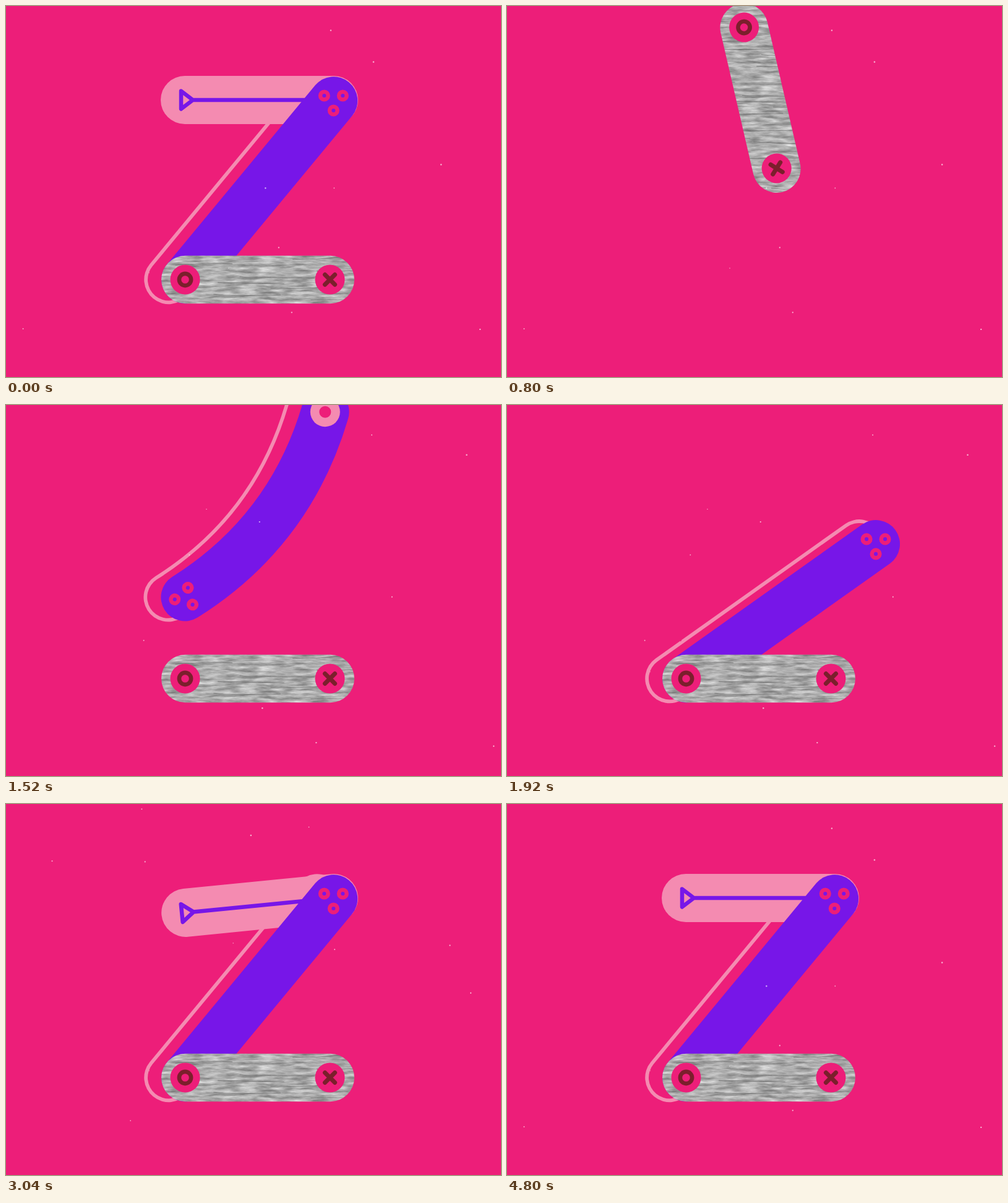
Recreate the animation shown at these times as an HTML page. Size 800 by 600 pixels, loop 4840 ms.

```html
<!DOCTYPE html>
<html lang="en">
<head>
<meta charset="utf-8">
<title>Z</title>
<style>
  html, body { margin: 0; height: 100%; overflow: hidden; background: #ed1e79; }
  svg { display: block; }
</style>
</head>
<body>
<svg width="800" height="600" viewBox="0 0 800 600" fill="none" stroke-linecap="round" stroke-linejoin="round">
  <defs>
    <path id="bar"/>
    <clipPath id="plank"><rect id="plankShape" x="-156" y="-38.7" width="312" height="77.4" rx="38.7"/></clipPath>
    <filter id="rough" filterUnits="userSpaceOnUse" x="0" y="0" width="800" height="600" color-interpolation-filters="sRGB">
      <feTurbulence type="fractalNoise" baseFrequency=".14" numOctaves="1" result="noise"/>
      <feDisplacementMap in="SourceGraphic" in2="noise" scale="1.6" xChannelSelector="R" yChannelSelector="G"/>
    </filter>
    <filter id="grain" filterUnits="userSpaceOnUse" x="-160" y="-160" width="320" height="320" color-interpolation-filters="sRGB">
      <feTurbulence type="fractalNoise" baseFrequency=".035 .2" numOctaves="4" seed="4"/>
      <feColorMatrix values=".55 0 0 0 .4  .55 0 0 0 .4  .55 0 0 0 .4  0 0 0 0 1"/>
    </filter>
  </defs>
  <rect width="800" height="600" fill="#ed1e79"/>
  <g filter="url(#rough)">
    <use href="#bar" x="-27" stroke="#f48bb1" stroke-width="79.5"/>
    <use href="#bar" x="-27" stroke="#ed1e79" stroke-width="68"/>
    <g id="pink">
      <path d="M0 0H241" stroke="#f48bb1" stroke-width="78"/>
      <path d="M0 0H228L247 -14.5V14.5L228 0" stroke="#7716e8" stroke-width="6.5"/>
    </g>
    <use href="#bar" stroke="#7716e8" stroke-width="77.5"/>
    <g id="ring">
      <circle r="24" fill="#f48bb1"/>
      <circle r="9.5" fill="#ed1e79"/>
    </g>
    <g id="dots" stroke="#ed1e79" stroke-width="6.5">
      <circle cx="-15.2" cy="-8" r="6.3"/>
      <circle cx="14.8" cy="-8" r="6.3"/>
      <circle cx="-.2" cy="16" r="6.3"/>
    </g>
  </g>
  <g id="wood">
    <g clip-path="url(#plank)">
      <rect x="-160" y="-160" width="320" height="320" filter="url(#grain)"/>
      <path id="cracks" stroke="#555" stroke-opacity=".55"/>
    </g>
    <g id="marks" stroke="#7b1f2c">
      <g fill="#ed1e79" stroke="none"><circle cx="-117.5" r="24"/><circle cx="116.5" r="24"/></g>
      <circle cx="-117.5" r="9.6" stroke-width="6.6"/>
      <path d="M108.5 -8l16 16m0 -16l-16 16" stroke-width="7"/>
    </g>
  </g>
  <g id="dust" fill="#fff" fill-opacity=".65"></g>
</svg>
<script>
const LOOP = 4840, STEP = 40, DUST_STEP = 80, DUST_SETS = 5, EXIT_END = 600;
const el = id => document.getElementById(id);
const place = (id, [x, y], angle = 0) =>
  el(id).setAttribute('transform', `translate(${x} ${y}) rotate(${angle})`);
const mix = (a, b, f) => a + (b - a) * f;
const polar = (r, deg) => [r * Math.cos(deg * Math.PI / 180), r * Math.sin(deg * Math.PI / 180)];

// Each piece falls from one centre and angle to another, then swings to rest.
const wood = {
  length: 234, start: 800, land: 1000, from: [409.5, 149], to: [407, 442.5],
  tilt: 77, rest: 360, swing: 18, swings: 2, settle: 500, drop: 10, spin: 22
};
const purple = {
  length: 375.7, start: 1520, land: 1660, from: [402.5, 161], to: [409.75, 297.75], hinged: true,
  tilt: 127.1, rest: 309.6, swing: 15.1, swings: 1, settle: 560, drop: 60, spin: 12
};
const pink = {
  length: 241, start: 2360, land: 2500, from: [379, -18], to: [409.5, 152], hinged: true,
  tilt: 37.3, rest: 180, swing: 24.2, swings: 2, settle: 900, drop: 110, spin: -14
};

function pose(p, t) {
  const leaving = t < EXIT_END;
  const gone = leaving ? Math.max(0, t - p.drop) : 0;
  const fall = leaving ? 1 : Math.min(1, (t - p.start) / (p.land - p.start));
  const s = leaving ? 1 : Math.min(1, Math.max(0, (t - p.land) / p.settle));
  const sway = p.swing * Math.sin(Math.PI * p.swings * s) * (1 - s) ** (p.swings - 1);
  const angle = mix(p.tilt, p.rest, fall) + sway + p.spin * (gone / 400) ** 2;

  const centre = [0, 1].map(k => mix(p.from[k], p.to[k], fall));
  centre[1] += .0034 * gone * gone;
  const arm = polar(p.length, angle);
  const half = polar(p.length / 2, p.hinged ? angle - sway : angle);
  const tail = centre.map((c, k) => c - half[k]);
  const head = tail.map((c, k) => c + arm[k]);
  return { angle, fall, centre, tail, head };
}

function seeded(seed) {
  return (low, high) => mix(low, high, (seed = seed * 16807 % 2147483647) / 2147483647);
}

function scatter() {
  const rand = seeded(7919);
  const repeat = (n, make) => Array.from({ length: n }, make).join('');
  el('cracks').setAttribute('d', repeat(34, (_, i) =>
    `M${rand(-160, 110)} ${-155 + i * 9.4}q${rand(20, 50)} ${rand(-5, 5)} ${rand(50, 130)} ${rand(-3, 5)}`));
  el('dust').innerHTML = repeat(DUST_SETS, () => '<g>' + repeat(10, () =>
    `<circle cx="${rand(2, 797)}" cy="${rand(8, 561)}" r="${rand(.7, 1.3)}"/>`) + '</g>');
}

function draw(t) {
  const w = pose(wood, t);
  place('wood', w.centre);
  for (const id of ['plankShape', 'marks']) place(id, [0, 0], w.angle);

  // The bar whips into a curve as it drops in.
  const p = pose(purple, t), [a, b] = [p.tail, p.head];
  const bend = 71 * Math.max(0, 1 - Math.abs(t - purple.start) / 140);
  const normal = polar(bend, p.angle - 90);
  const control = normal.map((n, k) => (a[k] + b[k]) / 2 + n);
  el('bar').setAttribute('d', `M${a}Q${control} ${b}`);
  place('ring', a);
  place('dots', b, 163.6 * (p.fall - 1));

  const hidden = t >= EXIT_END && t < pink.start - STEP;
  const k = pose(pink, t < EXIT_END ? t : Math.max(t, pink.start));
  place('pink', k.tail, k.angle);
  el('pink').style.display = hidden ? 'none' : '';

  const shown = Math.floor(t / DUST_STEP) % DUST_SETS;
  [...el('dust').children].forEach((g, i) => g.style.display = i === shown ? '' : 'none');
}

scatter();
const begin = performance.now();
let last = -1;
function tick() {
  const t = Math.floor((performance.now() - begin) % LOOP / STEP) * STEP;
  if (t !== last) draw(last = t);
  requestAnimationFrame(tick);
}
tick();
</script>
</body>
</html>
```
